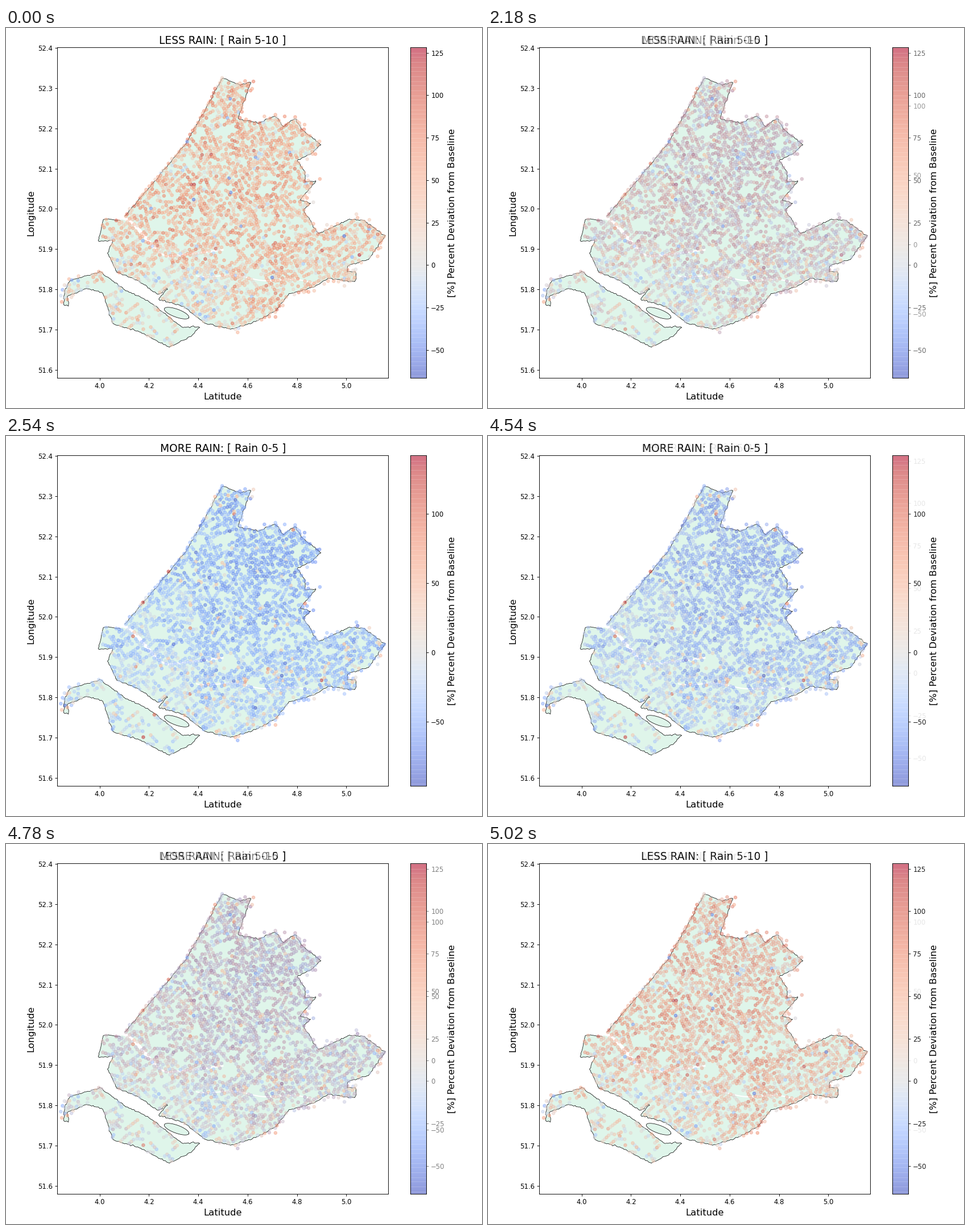
These frames come from a looping animation (837 by 669 pixels, 5.08 s). A matplotlib script:

```python
import numpy as np
import matplotlib.pyplot as plt
from matplotlib.animation import FuncAnimation
from matplotlib.colors import TwoSlopeNorm
from matplotlib.path import Path

W, H, DPI = 837, 669, 96
PT = 0.875  # type and line scale
STEP = 20   # ms per frame
HOLD, FADE, TICK = 2000, 540, 60
ALPHA = 0.47
LAND = "#dff5ea"
LEFT, TOP, RIGHT, BOTTOM = 90.4, 34.4, 672, 616
BAR_LEFT, BAR_RIGHT = 711, 739

plt.rcParams.update({
    "font.family": "DejaVu Sans",
    "font.size": 10 * PT,
    "axes.titlesize": 16 * PT,
    "axes.labelsize": 14 * PT,
    "axes.titlepad": 6 * PT,
    "axes.labelpad": 4 * PT,
    "axes.linewidth": 0.8 * PT,
})
for a in ("xtick", "ytick"):
    plt.rcParams.update({f"{a}.major.size": 3.5 * PT,
                         f"{a}.major.pad": 3.5 * PT,
                         f"{a}.major.width": 0.8 * PT})

# Key points of the border, in stage pixels
COAST = [(209, 331), (250, 283), (315, 205), (350, 145), (380, 88)]
NORTH = [(411, 100), (431, 95), (417, 133), (408, 160), (445, 167), (474, 154),
         (487, 174), (509, 158), (520, 179), (554, 205), (537, 221), (512, 233),
         (526, 254), (526, 271), (546, 269), (516, 303), (536, 308), (523, 320)]
EAST = [(549, 362), (575, 351), (602, 337), (628, 338), (667, 366), (638, 407),
        (601, 418), (600, 428), (616, 430), (614, 447), (567, 441), (541, 456),
        (497, 469), (474, 498), (440, 516), (399, 530)]
SOUTH = [(350, 520), (312, 490), (268, 478), (284, 457), (268, 470), (235, 446),
         (195, 430), (179, 396), (188, 374), (162, 376), (172, 336), (201, 339)]
ISLAND = [(103, 463), (113, 444), (166, 429), (212, 463), (250, 480), (310, 527),
          (340, 526), (327, 542), (287, 562), (235, 535), (188, 521), (170, 466),
          (140, 459), (108, 472), (110, 490), (101, 487), (103, 463)]

rng = np.random.default_rng(12)


def resample(pts, step):
    pts = np.array(pts, float)
    dist = np.r_[0, np.cumsum(np.hypot(*np.diff(pts, axis=0).T))]
    s = np.linspace(0, dist[-1], int(dist[-1] / step) + 1)
    return np.c_[np.interp(s, dist, pts[:, 0]), np.interp(s, dist, pts[:, 1])]


def rough(pts):
    line = resample(pts, 3)
    line[1:-1] += rng.normal(0, 0.6, (len(line) - 2, 2))
    return line


def ellipse(cx, cy, rx, ry, tilt):
    a, t = np.linspace(0, 2 * np.pi, 40), np.radians(tilt)
    x, y = rx * np.cos(a), ry * np.sin(a)
    return np.c_[cx + x * np.cos(t) - y * np.sin(t),
                 cy + x * np.sin(t) + y * np.cos(t)]


SHAPES = [rough(COAST + NORTH + EAST + SOUTH), rough(ISLAND),
          ellipse(300, 502, 23, 7, 20)]


def waterways():
    """The harbour mouth, the river it narrows into, and a southern branch."""
    x = np.linspace(202, 381, 90)
    u = np.clip((x - 202) / 85, 0, 1)
    y = 334 + 68 * u * u * (3 - 2 * u) - 0.12 * np.clip(x - 287, 0, None)
    yield 4.5, x[:30], y[:30]
    yield 2.2, x[28:], y[28:]
    x = np.linspace(335, 552, 90)
    yield 1.5, x, 434 + (x - 335) / 15 + 3 * np.sin(x / 17)


def streaks(shape, n):
    """Short dotted runs, as along ditches and canals, inside a shape."""
    start = rng.uniform(shape.min(0), shape.max(0), (n, 2))
    angle = np.radians(rng.choice([-38, 55, 10], n, p=[.45, .4, .15]))
    angle += rng.normal(0, 0.2, n)
    runs = [p + 5 * np.arange(k)[:, None] * [np.cos(a), np.sin(a)]
            for p, a, k in zip(start, angle, rng.integers(1, 7, n))]
    pts = np.concatenate(runs)
    return pts[Path(shape).contains_points(pts)]


def fringe(pts, step, spread):
    """Patches of dots scattered about a line."""
    line = resample(pts, step)
    line = line[np.sin(np.arange(len(line)) * step / 11) > -0.3]
    return line + rng.normal(0, spread, line.shape)


def thin(pts, gap):
    kept = np.empty_like(pts)
    n = 0
    for p in pts:
        if n == 0 or ((kept[:n] - p) ** 2).sum(1).min() > gap ** 2:
            kept[n] = p
            n += 1
    return kept[:n]


def make_dots():
    shore = resample(COAST, 4.4)
    shore += rng.normal(0, 1, shore.shape)
    inland = streaks(SHAPES[0], 2800)
    x, y = inland.T
    bare = np.sin(x / 19) + np.sin(y / 17 + x / 41) > 1.6
    bare |= np.hypot(x - 475, y - 352) < 25
    inland = inland[~bare | (rng.random(len(x)) < 0.25)]
    parts = [shore, inland, fringe(NORTH, 3, 6), fringe(EAST, 4, 6),
             streaks(SHAPES[1], 100), fringe(ISLAND[:3], 2, 5),
             fringe(ISLAND[-5:], 4, 5)]
    return thin(np.concatenate(parts), 3.9)


def extremes(values, hot, cold, n):
    """Give n dots a very high value and n a very low one."""
    pick = rng.permutation(len(values))[:2 * n]
    values[pick[:n]] = rng.uniform(*hot, n)
    values[pick[n:]] = rng.uniform(*cold, n)


def make_values(x, y):
    n = len(x)
    south = np.clip((y - 360) / 90, 0, 1)
    west = np.clip((470 - x) / 110, 0, 1)
    wave = np.sin(x / 23 + y / 31) * np.cos(y / 37 - x / 29)

    less = 53 - 25 * south * west - 13 * np.clip((x - 470) / 90, 0, 1)
    less += 8 * wave + rng.normal(0, 19, n)
    less -= 35 * (rng.random(n) < 0.13 + 0.1 * south * west)
    less = np.clip(less, -35, 95)
    extremes(less, (95, 125), (-60, -35), 14)

    more = -46 + 12 * south - 9 * ((y < 270) & (x > 390))
    more = more + 12 * ((x < 330) & (y > 255))
    more += 5 * wave + rng.normal(0, 14, n)
    rim = (x > 590) | (x < 165) | (y < 125)
    warm = rng.random(n) < 0.03 + 0.11 * south + 0.14 * rim
    more[warm] = rng.uniform(0, 55, warm.sum())
    more = np.clip(more, -75, 80)
    extremes(more, (85, 135), (-95, -80), 14)
    return less, more


X, Y = rng.permutation(make_dots()).T
LESS, MORE = make_values(X, Y)

fig = plt.figure(figsize=(W / DPI, H / DPI), dpi=DPI, facecolor="white")


def box(x0, x1):
    return fig.add_axes([x0 / W, 1 - BOTTOM / H, (x1 - x0) / W, (BOTTOM - TOP) / H])


def draw_map(title, values, norm):
    ax = box(LEFT, RIGHT)
    for shape in SHAPES:
        ax.fill(*shape.T, fc=LAND, ec="none", zorder=1)
        ax.plot(*shape.T, color="black", lw=0.55, zorder=2)
    for width, x, y in waterways():
        ax.plot(x, y, color="white", lw=width, zorder=1.5)
    ax.scatter(X, Y, c=values, cmap="coolwarm", norm=norm, alpha=ALPHA,
               s=18 * PT ** 2, linewidths=1.5 * PT, zorder=3)
    lon = np.arange(4.0, 5.1, 0.2)
    lat = np.arange(51.6, 52.45, 0.1)
    ax.set_xticks(164.5 + 433.8 * (lon - 4), [f"{v:.1f}" for v in lon])
    ax.set_yticks(35 + 708.75 * (52.4 - lat), [f"{v:.1f}" for v in lat])
    ax.set(xlim=(LEFT, RIGHT), ylim=(BOTTOM, TOP), title=title,
           xlabel="Latitude", ylabel="Longitude")


def draw_bar(norm, ticks):
    ax = box(BAR_LEFT, BAR_RIGHT)
    edges = np.linspace(norm.vmin, norm.vmax, 257)
    mid = (edges[1:] + edges[:-1]) / 2
    # Overlapping translucent cell edges give the fine stripes
    ax.pcolormesh([0, 1], edges, mid[:, None], cmap="coolwarm", norm=norm,
                  alpha=ALPHA, edgecolors="face", linewidth=0.3, antialiased=True)
    ax.yaxis.tick_right()
    ax.yaxis.set_label_position("right")
    ax.set(xticks=[], yticks=ticks, xlim=(0, 1), ylim=(norm.vmin, norm.vmax),
           ylabel="[%] Percent Deviation from Baseline")


def render(title, values, vmin, vmax, ticks):
    fig.clear()
    norm = TwoSlopeNorm(0, vmin, vmax)
    draw_map(title, values, norm)
    draw_bar(norm, ticks)
    fig.canvas.draw()
    return np.array(fig.canvas.buffer_rgba())[..., :3].astype(float)


dry = render("LESS RAIN: [ Rain 5-10 ]", LESS, -66.4, 128.1, range(-50, 126, 25))
wet = render("MORE RAIN: [ Rain 0-5 ]", MORE, -96.1, 141.8, range(-50, 101, 50))
fig.clear()
view = fig.figimage(dry.astype(np.uint8))


def fade(t):
    """Share of the second map: hold, then nine steps of a tenth."""
    half, t = divmod(t, HOLD + FADE)
    k = 0 if t < HOLD else ((t - HOLD) // TICK + 1) / 10
    return 1 - k if half else k


def update(i):
    k = fade(i * STEP)
    view.set_data(np.rint(dry + (wet - dry) * k).astype(np.uint8))
    return [view]


anim = FuncAnimation(fig, update, frames=2 * (HOLD + FADE) // STEP,
                     interval=STEP, repeat=True, repeat_delay=0, blit=False)
plt.show()
```
